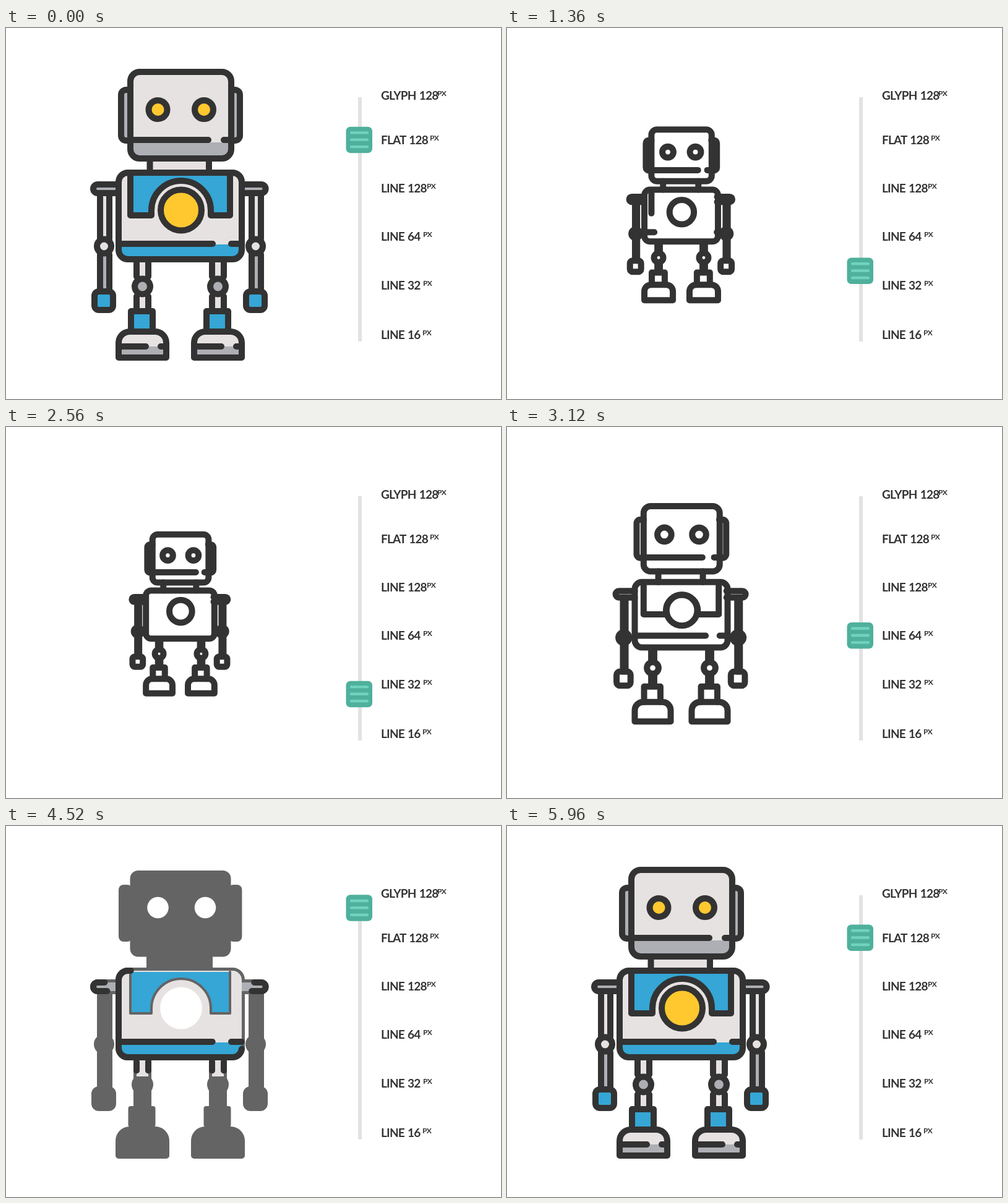
An HTML page that plays this animation: 800x600 px, repeating every 6000 ms.

```html
<!DOCTYPE html>
<html lang="en">
<head>
<meta charset="utf-8">
<title>Icon sizes</title>
<style>
html, body { margin: 0; width: 100%; height: 100%; overflow: hidden; background: #fff; }
svg { display: block; width: 800px; height: 600px; }
text { font-family: Lato, sans-serif; font-weight: 700; fill: #333; }
.label { font-size: 19px; letter-spacing: -.8px; word-spacing: 1.4px; }
.unit { font-size: 12px; letter-spacing: -.5px; }
</style>
</head>
<body>
<svg viewBox="0 0 800 600">
  <rect x="569" y="112" width="6" height="395" fill="#e2e2e2"/>
  <g id="labels"></g>
  <g id="handle">
    <rect x="549.5" y="-21" width="42.5" height="42.5" rx="7" fill="#4fb09c"/>
    <path d="M558 -11.3H584M558 0H584M558 11.5H584" stroke="#6fd3be" stroke-width="4.4" stroke-linecap="round"/>
  </g>
  <g id="glyph" fill="#646464" stroke-linejoin="round"></g>
  <g id="robot" fill="none" stroke-linecap="round" stroke-linejoin="round"></g>
  <g id="tiny" fill="#333"></g>
</svg>
<script>
const DARK = '#333', LIGHT = '#e6e2e1', GREY = '#adafb5', BLUE = '#35a6d5', YELLOW = '#ffc82f';
const $ = id => document.getElementById(id);
const clamp = v => Math.max(0, Math.min(1, v));
const lerp = (a, b, k) => a + (b - a) * k;
const ease = k => k < .5 ? 2 * k * k : 1 - 2 * (1 - k) ** 2;

function add(parent, tag, attrs = {}) {
  const el = document.createElementNS('http://www.w3.org/2000/svg', tag);
  for (const key in attrs) el.setAttribute(key, attrs[key]);
  parent.appendChild(el);
  return el;
}

// Path helpers; the rounded box starts top right and runs counter-clockwise.
function box(x, y, w, h, r = 0) {
  const arc = (dx, dy) => `a${r} ${r} 0 0 0 ${dx} ${dy}`;
  return `M${x + w - r} ${y}H${x + r}${arc(-r, r)}V${y + h - r}${arc(r, r)}H${x + w - r}${arc(r, -r)}V${y + r}${arc(-r, -r)}z`;
}
const disc = (x, y, r) => `M${x + r} ${y}a${r} ${r} 0 1 0 ${-2 * r} 0a${r} ${r} 0 1 0 ${2 * r} 0z`;
const shift = dx => `translate(${dx} 0)`;
const mirror = axis => `matrix(-1 0 0 1 ${2 * axis} 0)`;

// Two parallel lines that close up as the icon gets smaller.
const rails = (x, wide, narrow, y1, y2) => [-1, 1].map(side => level =>
  `M${x + side * lerp(wide, narrow, clamp(level))} ${y1}V${y2}`);

// Slider stops, from glyph down to the smallest line icon.
const STOPS = [108.5, 180.5, 258.5, 337, 416, 495.5];

[['GLYPH 128', 697], ['FLAT 128', 685], ['LINE 128', 680],
 ['LINE 64', 674], ['LINE 32', 674], ['LINE 16', 673]].forEach(([name, x], i) => {
  const y = STOPS[i] + 7;
  add($('labels'), 'text', { class: 'label', x: 606, y }).textContent = name;
  add($('labels'), 'text', { class: 'unit', x, y: y - 6 }).textContent = 'PX';
});

// ---- shapes shared by the outlined robot and the glyph ----
const arms = ['', shift(245)], legs = ['', shift(122)], shoulders = ['', mirror(280.3)];
const elbow = disc(158.5, 353, 11.5), knee = disc(220.5, 418, 12.5);
const hand = box(143, 426, 30, 30, 7);
const foot = 'M182 533V509a18 18 0 0 1 18 -18H241a18 18 0 0 1 18 18V533z';
const body = box(182, 234, 199, 140, 15);

// ---- outlined robot ----
// Share of the glyph change in which a part dissolves.
const EARLY = [0, .6], LATE = [.333, 1], LAST = [.667, 1];
const fills = [], lines = [];

// keep: length of the lines left at a given level of simplicity
function part(when, colours, strokes, spots = [''], more = {}) {
  for (const transform of spots) {
    const g = add($('robot'), 'g', { transform });
    for (const [fill, d] of colours) fills.push({ el: add(g, 'path', { fill, d }), when });
    for (const d of strokes) {
      const el = add(g, 'path', { stroke: DARK, pathLength: 1 });
      if (typeof d === 'string') el.setAttribute('d', d);
      lines.push({ el, when, shape: d, keep: () => 1, ...more });
    }
  }
}

const shoulder = 'M182 253H148a7 7 0 0 0 0 14H182';
const ankle = 'M202 491V458H237V491';
const ear = 'M201 100H194a8 8 0 0 0 -8 8V174a8 8 0 0 0 8 8H201';
const head = box(201, 71, 163, 140, 15);
const eyes = disc(245.5, 132, 15) + disc(320, 132, 15);
const core = disc(283, 294.5, 33);
function panel(level) {
  const r = lerp(48, 34, clamp(level));
  return `M201 236V303H${283 - r}V295A${r} ${r} 0 0 1 ${283 + r} 295V303H362V236`;
}

part(EARLY, [[LIGHT, box(152, 267, 15, 73)], [GREY, box(152, 367, 15, 59)]],
  [...rails(159.5, 7.5, 2.7, 267, 341), ...rails(159.5, 7.5, 2.7, 366, 426)], arms);
part(EARLY, [[LIGHT, elbow]], [elbow], arms);
part(EARLY, [[BLUE, hand]], [hand], arms);
part(LATE, [[GREY, shoulder]], [shoulder], shoulders);
const plugs = arms.map(transform => add($('robot'), 'circle', { cx: 158.5, cy: 353, fill: DARK, transform }));

part(LATE, [[LIGHT, box(211, 376, 19, 29)]], rails(220.5, 9.5, 3.2, 402, 376), legs);
part(EARLY, [[LIGHT, box(211, 432, 19, 25)]], rails(220.5, 9.5, 3.2, 434, 457), legs);
part(EARLY, [[GREY, knee]], [knee], legs);
part(EARLY, [[BLUE, ankle]], [ankle], legs);
part(EARLY, [[LIGHT, foot], [GREY, box(182, 515, 77, 18)]], [foot], legs);
part(EARLY, [], ['M182 515H226', 'M259 515H250'], legs, { keep: level => 1 - level });

part(EARLY, [[LIGHT, box(232, 211, 96, 23)]], ['M232.5 211V234', 'M328 211V234']);
part(EARLY, [[GREY, ear]], [ear], ['', mirror(282)]);
part(EARLY, [[LIGHT, head], [GREY, 'M201 185H364V196a15 15 0 0 1 -15 15H216a15 15 0 0 1 -15 -15z']], [head]);
part(EARLY, [], ['M201 181H327', 'M364 181H352']);
part(EARLY, [[YELLOW, eyes]], [disc(245.5, 132, 15), disc(320, 132, 15)]);

part(LATE, [[LIGHT, body], [BLUE, panel(0)],
  [BLUE, 'M182 350H381V359a15 15 0 0 1 -15 15H197a15 15 0 0 1 -15 -15z']], []);
part(LATE, [], [panel], [''], { keep: level => 2 - level, thin: true });
part(LATE, [], [body]);
part(LAST, [], ['M182 349H334', 'M381 349H364'], [''], { keep: level => 2 - level });
part(LATE, [['#fff', disc(283, 294.5, 34)]], []);
part(EARLY, [[YELLOW, core]], [core]);

// ---- solid glyph: every piece grows from the middle of its base ----
const pieces = [];
function piece(d, spots = [''], { edge = 0, white = '', pivot } = {}) {
  for (const transform of spots) {
    const g = add(add($('glyph'), 'g', { transform }), 'g');
    const b = add(g, 'path', { d, stroke: '#646464', 'stroke-width': edge }).getBBox();
    add(g, 'path', { d: white, fill: '#fff' });
    const [x, y] = pivot || [b.x + b.width / 2, b.y + b.height + edge / 2];
    pieces.push({ g, x, y });
  }
}
const outlined = { edge: 10 };
piece('M177 248H148a12 12 0 0 0 0 24H177z', shoulders);
piece(box(147, 266, 25, 84), arms);
piece(elbow, arms, outlined);
piece(box(147, 360, 25, 65), arms);
piece(hand, arms, outlined);
piece(box(206, 375, 29, 80), legs);
piece(knee, legs, outlined);
piece(box(197.5, 453, 44, 34, 4), legs);
piece(foot, legs, outlined);
piece(box(227, 210, 107, 21.5));
piece(box(182, 95, 22, 92, 8), ['', mirror(281.7)], { pivot: [208, 141] });
piece(box(200.5, 72, 163, 139.5, 13), [''], { white: disc(245.5, 132, 17.3) + disc(322, 132, 17.3) });
piece(body, [''], { edge: 10, white: disc(283, 294.5, 34.5) });

// ---- smallest icon ----
for (const transform of ['', mirror(283.2)]) {
  add($('tiny'), 'path', { transform, d: box(216.5, 273, 22, 99, 8) + box(247, 335, 16, 12) + box(240, 342, 29, 71, 9) });
}
add($('tiny'), 'path', { d: box(241, 193, 85, 82, 12) + box(241, 262, 85, 78, 12) });
add($('tiny'), 'path', { d: box(257, 213, 52, 34) + box(261, 279, 45, 42), fill: '#fff' });
add($('tiny'), 'path', { d: disc(267, 230, 4.3) + disc(300, 230, 4.3) + disc(283.2, 298.5, 5.2) });
add($('tiny'), 'path', { d: disc(283.2, 298.5, 2), fill: '#fff' });

// ---- timing: start, duration, stop reached ----
const MOVES = [[0, 480, 2], [600, 360, 3], [1080, 400, 4], [1600, 360, 5], [2240, 400, 4],
  [2760, 360, 3], [3280, 360, 2], [3760, 480, 1], [4280, 360, 0], [5600, 360, 1]];

function stopAt(t) {
  let stop = 1;
  for (const [start, span, next] of MOVES) stop = lerp(stop, next, clamp((t - start) / span));
  return stop;
}

const sizeAt = level => .754 ** level;
const TINY_SIZE = sizeAt(2.9);

function zoom(el, x, y, k) {
  el.setAttribute('transform', `translate(${x} ${y}) scale(${k}) translate(${-x} ${-y})`);
}

function drawLine(line, level, k, size) {
  const set = (key, v) => line.el.setAttribute(key, v);
  let start = 0, end = clamp(line.keep(level));
  if (typeof line.shape === 'function') set('d', line.shape(level));
  if (line.thin) {
    const v = Math.round(lerp(51, 100, clamp(2 * k)));
    set('stroke', `rgb(${v},${v},${v})`);
    set('stroke-width', lerp(10, 4, clamp(2 * k)) / size);
    set('opacity', clamp((1 - k) * 3));
  } else {
    start = .5 * k;
    end = Math.min(end, 1 - .32 * k - .18 * k * k);
  }
  const length = end - start;
  set('visibility', length > .001 ? 'inherit' : 'hidden');
  set('stroke-dasharray', length === 1 ? 'none' : `${Math.max(0, length)} 2`);
  set('stroke-dashoffset', -start);
}

function draw(t) {
  const stop = stopAt(t);
  const i = Math.min(4, Math.floor(stop));
  $('handle').setAttribute('transform', `translate(0 ${lerp(STOPS[i], STOPS[i + 1], stop - i)})`);

  const level = Math.max(0, i - 2 + ease(stop - i));
  const colour = 1 - ease(clamp(stop - 1));
  const solid = clamp(1 - stop);
  const size = sizeAt(level);
  const gone = ([from, to]) => clamp((solid - from) / (to - from));

  const swap = clamp((level - 2.4) * 5);
  const robot = $('robot'), tiny = $('tiny');
  zoom(robot, 281.5, 302.5, size);
  robot.setAttribute('stroke-width', 10 / size);
  robot.setAttribute('opacity', 1 - swap);
  zoom(tiny, 283, 302.5, size / TINY_SIZE);
  tiny.setAttribute('opacity', swap);

  plugs.forEach(p => p.setAttribute('r', 7 * clamp(level)));
  for (const f of fills) f.el.setAttribute('opacity', colour * clamp((1 - gone(f.when)) * 3));
  for (const l of lines) drawLine(l, level, gone(l.when), size);

  // Pieces shrink away and regrow, lower ones first.
  $('glyph').setAttribute('visibility', solid > 0 ? 'visible' : 'hidden');
  const grow = Math.abs(t - 5120) / 360;
  for (const p of pieces) zoom(p.g, p.x, p.y, clamp(grow - .108 + p.y / 2000));
}

const begin = performance.now();
function tick() {
  draw((performance.now() - begin) % 6000);
  requestAnimationFrame(tick);
}
tick();
</script>
</body>
</html>
```
